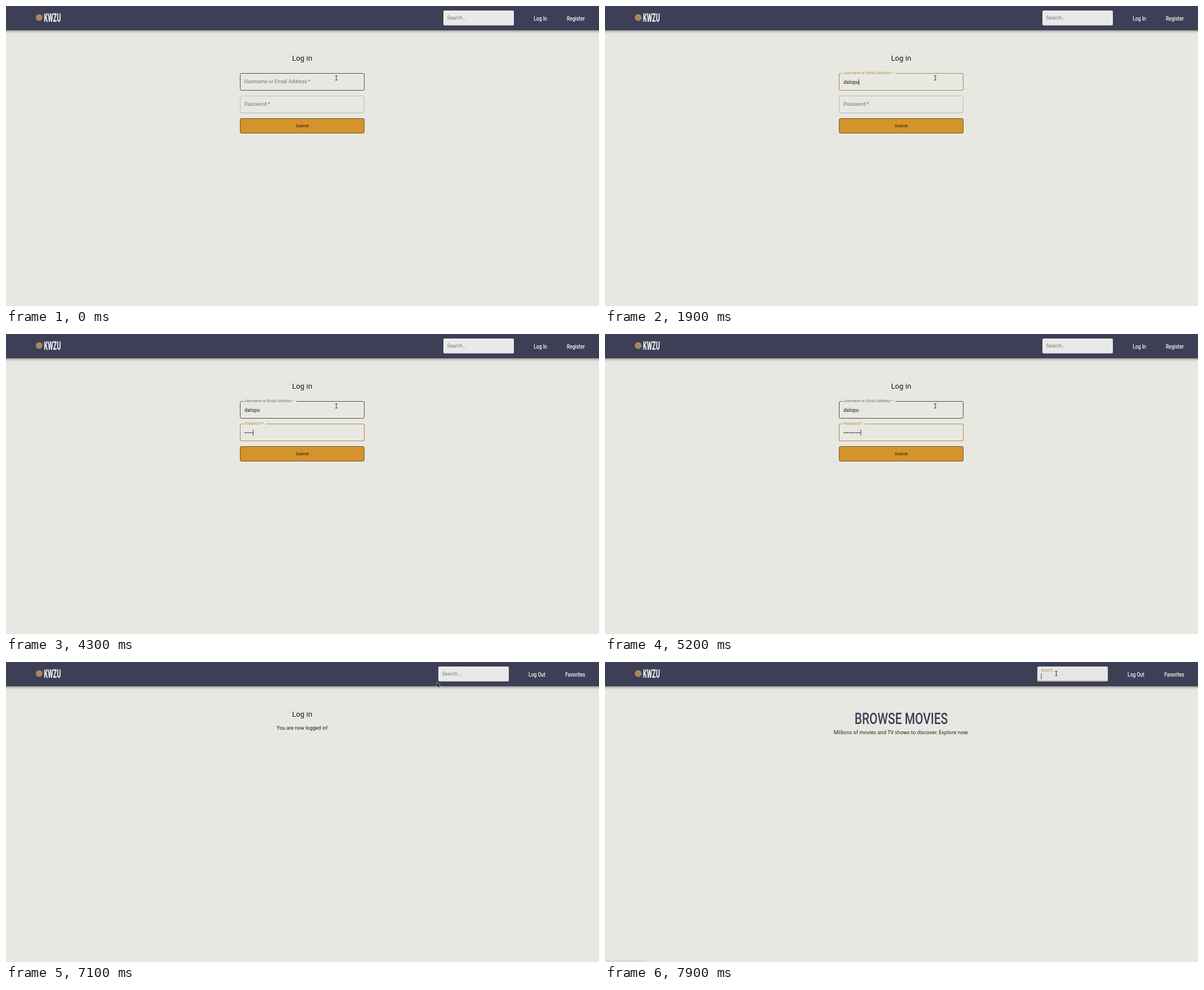
An HTML page with a canvas that plays this animation: 1052x532 px, repeating every 8 s.

```html
<!DOCTYPE html>
<html lang="en">
<head>
<meta charset="utf-8">
<title>Log in</title>
<style>
  html, body { margin: 0; width: 100%; height: 100%; overflow: hidden; background: #e8e8e2; }
  canvas { display: block; width: 1052px; height: 532px; }
</style>
</head>
<body>
<canvas id="stage"></canvas>
<script>
const W = 1052, H = 532, LOOP = 8000, STEP = 100;
const canvas = document.getElementById('stage');
const ctx = canvas.getContext('2d');
const ratio = window.devicePixelRatio || 1;
canvas.width = W * ratio;
canvas.height = H * ratio;

const PAGE = '#e8e8e2', NAVY = '#3d3f56', GOLD = '#b68b4a', AMBER = '#d4932b';
const INK = '#151515', GREY = '#72726f';
const ROBOTO = 'Roboto, sans-serif';
const BODY = 8.8, SMALL = 0.75, SPACING = 0.0094;

const USER = 'dalopu';
const USER_KEYS = [1200, 1300, 1400, 1500, 1700, 1900];
const PASS_KEYS = [3500, 3800, 4000, 4200, 4300, 4600, 4800, 4900, 5100, 5200];
const USER_FOCUS = 600, PASS_FOCUS = 3500, LOGGED_IN = 5500, BROWSE = 7600;

// time, x, y of the pointer
const PATH = [
  [6600, 586, 127.5], [6800, 632, 104], [7000, 727, 54],
  [7100, 765, 37], [7200, 785, 28], [7400, 800.5, 20.5]
];

const clamp = v => Math.max(0, Math.min(1, v));
const mix = (a, b, p) => a + (b - a) * p;
const easeOut = p => 1 - Math.pow(1 - p, 3);
const countKeys = (keys, t) => keys.filter(k => t >= k).length;
// short transition that is already under way on its first step
const shrinkAt = (t, start) => easeOut(clamp((t - start + 50) / 200));

function text(str, x, y, o = {}) {
  const size = o.size || BODY;
  ctx.save();
  ctx.translate(x, y);
  ctx.scale(o.narrow || 1, 1);
  ctx.font = `${o.weight || 400} ${size}px ${o.family || ROBOTO}`;
  ctx.letterSpacing = (o.spacing || 0) * size + 'px';
  ctx.textAlign = o.align || 'left';
  ctx.fillStyle = o.color || INK;
  ctx.fillText(str, 0, 0);
  const width = ctx.measureText(str).width;
  ctx.restore();
  return width;
}

function roundRect(x, y, w, h, r) {
  ctx.beginPath();
  ctx.roundRect(x, y, w, h, r);
}

function outline(color, width) {
  ctx.strokeStyle = color;
  ctx.lineWidth = width;
  ctx.stroke();
}

function rect(x, y, w, h, color) {
  ctx.fillStyle = color;
  ctx.fillRect(x, y, w, h);
}

function caret(x, y) {
  rect(x, y, 0.75, 11, INK);
}

function drawSearch(x, focus, hover) {
  roundRect(x, 8, 125, 26.4, 2.2);
  ctx.fillStyle = hover ? '#e6e6e6' : '#e9e9e9';
  ctx.fill();
  rect(x + 1, 33.9, 123, 0.5, 'rgba(0,0,0,.2)');
  if (focus > 0) rect(x + 0.5, 33.4, 124, 1, '#a58c63');
  text('Search...', x + 6.5, mix(24.3, 17.3, focus), {
    size: BODY * mix(1, SMALL, focus),
    spacing: SPACING,
    color: focus > 0 ? GOLD : '#777'
  });
  if (focus > 0) caret(x + 6.7, 20.3);
}

function drawHeader(t, hover) {
  ctx.save();
  ctx.shadowColor = 'rgba(0,0,0,.45)';
  ctx.shadowBlur = 5 * ratio;
  ctx.shadowOffsetY = 1.5 * ratio;
  rect(-10, -10, W + 20, 53, NAVY);
  ctx.restore();

  ctx.fillStyle = '#a5885c';
  ctx.beginPath();
  ctx.arc(58.8, 20.5, 6, 0, Math.PI * 2);
  ctx.fill();
  text('KWZU', 67.3, 27.6, { size: 20, weight: 900, narrow: 0.54, color: '#e9e9ea' });

  const inside = t >= LOGGED_IN;
  drawSearch(inside ? 767 : 776, t >= BROWSE ? shrinkAt(t, BROWSE) : 0, hover);
  const nav = { size: 11.4, weight: 500, narrow: 0.75, color: '#f4f4f4' };
  text(inside ? 'Log Out' : 'Log In', inside ? 927 : 936.2, 25.8, nav);
  text(inside ? 'Favorites' : 'Register', inside ? 992.3 : 995, 25.8, nav);
}

function drawField(f) {
  const label = f.label + '\u2009*';
  roundRect(415.5, f.y, 220, 30, 2.2);
  outline(f.focused ? GOLD : f.hover ? '#3a3a39' : '#b5b5b0', f.focused ? 1.1 : 0.9);
  if (f.shrink > 0) {
    rect(420.8, f.y - 1.5, f.notch * f.shrink, 3, PAGE);
  }
  text(label, 423, mix(f.y + 17.8, f.y + 1.8, f.shrink), {
    size: BODY * mix(1, SMALL, f.shrink),
    spacing: 0.012,
    color: f.focused ? GOLD : GREY
  });
  const width = text(f.value, 423, f.y + 18.3, { spacing: SPACING });
  if (f.focused) caret(423 + width, f.y + 10);
}

function drawTitle() {
  text('Log in', 525.3, 96.9, { size: 13.2, align: 'center' });
}

function drawForm(t) {
  drawTitle();
  drawField({
    label: 'Username or Email Address', y: 119.5, notch: 94.5, hover: true,
    focused: t >= USER_FOCUS && t < PASS_FOCUS,
    shrink: t >= USER_FOCUS ? shrinkAt(t, USER_FOCUS) : 0,
    value: USER.slice(0, countKeys(USER_KEYS, t))
  });
  drawField({
    label: 'Password', y: 159.5, notch: 40.3, hover: false,
    focused: t >= PASS_FOCUS,
    shrink: t >= PASS_FOCUS ? 1 : 0,
    value: '\u2022'.repeat(countKeys(PASS_KEYS, t))
  });
  roundRect(415.5, 199.5, 220, 26, 2.2);
  ctx.fillStyle = AMBER;
  ctx.fill();
  outline('#624a1e', 0.9);
  text('Submit', 525.4, 215, {
    size: 7.33, family: '"Liberation Sans", sans-serif', align: 'center'
  });
}

function drawWelcome() {
  drawTitle();
  text('You are now logged in!', 525.4, 119.5, { spacing: SPACING, align: 'center' });
}

function drawBrowse(t) {
  text('BROWSE MOVIES', 525.5, 109.8, {
    size: 28.5, weight: 500, narrow: 0.735, align: 'center', color: NAVY
  });
  text('Millions of movies and TV shows to discover. Explore now.', 525.5, 127.8, {
    family: '"Noto Sans", sans-serif', spacing: 0.0075, align: 'center'
  });
  if (t >= BROWSE + STEP) {
    roundRect(-3, 528.4, 76, 8, 2);
    ctx.fillStyle = '#dcdddc';
    ctx.fill();
    outline('#cbccca', 0.5);
  }
}

function pointerAt(t) {
  if (t <= PATH[0][0]) return { x: PATH[0][1], y: PATH[0][2] };
  for (let i = 1; i < PATH.length; i++) {
    const [t0, x0, y0] = PATH[i - 1], [t1, x1, y1] = PATH[i];
    if (t <= t1) {
      const p = (t - t0) / (t1 - t0);
      return { x: mix(x0, x1, p), y: mix(y0, y1, p) };
    }
  }
  const [, x, y] = PATH[PATH.length - 1];
  return { x, y };
}

function drawBeam(x, y) {
  ctx.beginPath();
  for (const end of [-3.8, 3.8]) {
    ctx.moveTo(x - 2.1, y + end);
    ctx.lineTo(x + 2.1, y + end);
  }
  ctx.moveTo(x, y - 3.8);
  ctx.lineTo(x, y + 3.8);
  outline('#111', 0.8);
}

function drawArrow(x, y) {
  const points = [[0, 0], [0, 7.3], [1.6, 5.8], [2.8, 8.5], [4, 8], [2.8, 5.3], [5, 5.2]];
  ctx.beginPath();
  for (const [dx, dy] of points) ctx.lineTo(x + dx, y + dy);
  ctx.closePath();
  ctx.lineJoin = 'round';
  outline('#f2f2f2', 1.1);
  ctx.fillStyle = '#000';
  ctx.fill();
}

function draw(time) {
  const t = Math.floor((time % LOOP) / STEP) * STEP;
  const pointer = pointerAt(t);
  const overSearch = pointer.x > 767 && pointer.y < 34;
  ctx.setTransform(ratio, 0, 0, ratio, 0, 0);
  rect(0, 0, W, H, PAGE);
  drawHeader(t, overSearch);
  if (t < LOGGED_IN) drawForm(t);
  else if (t < BROWSE) drawWelcome();
  else drawBrowse(t);
  const beam = t < LOGGED_IN || overSearch;
  (beam ? drawBeam : drawArrow)(pointer.x, pointer.y);
}

const start = performance.now();
function tick() {
  draw(performance.now() - start);
  requestAnimationFrame(tick);
}
tick();
</script>
</body>
</html>
```
